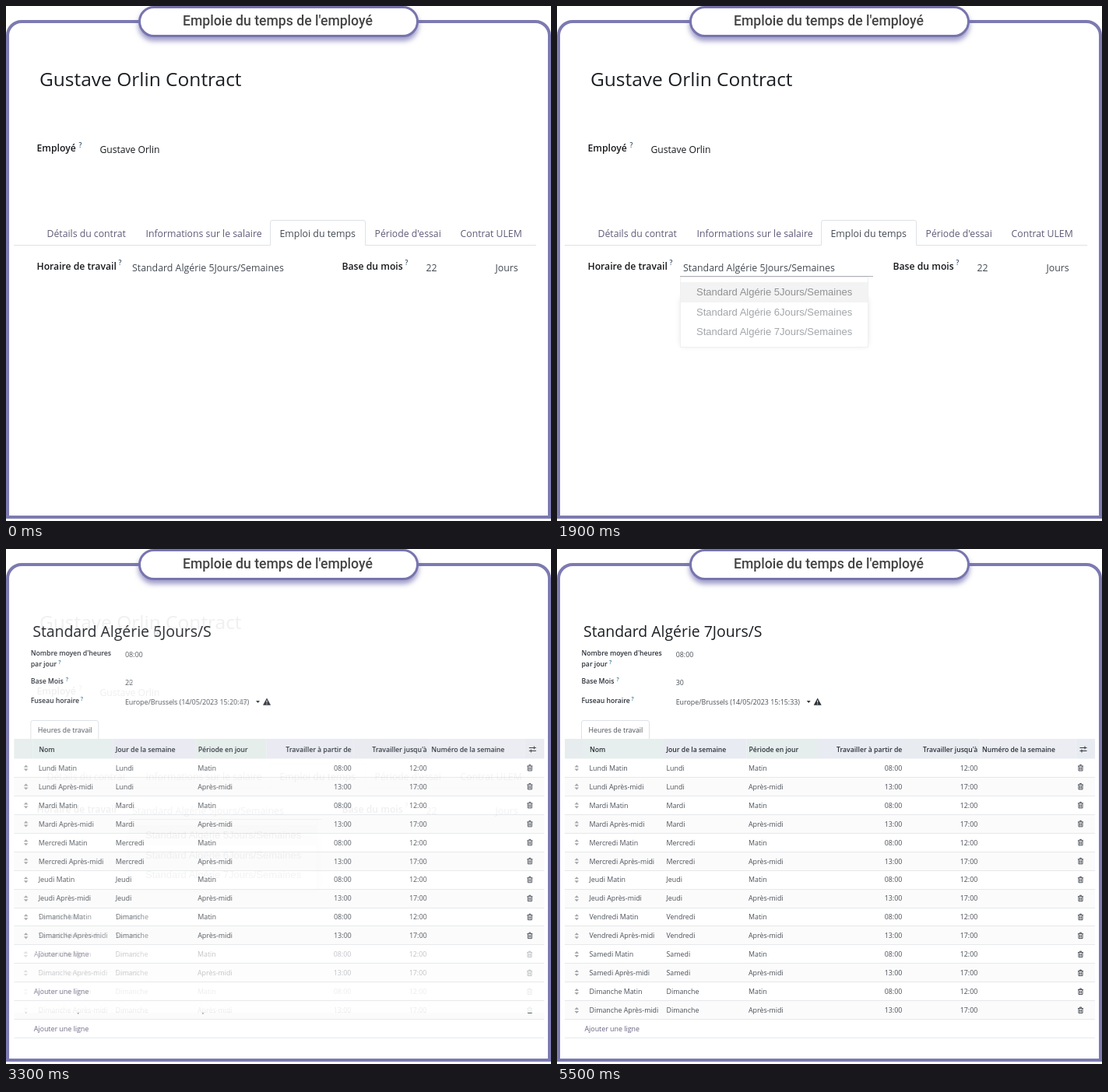
Animation of 700x662 px, one loop 6.5 s. Source, as an HTML page:

```html
<!DOCTYPE html>
<html lang="fr">
<head>
<meta charset="utf-8">
<title>Emploi du temps</title>
<style>
  html, body { margin: 0; width: 100%; height: 100%; overflow: hidden; background: #fff; }
  #stage { position: relative; width: 700px; height: 662px; overflow: hidden; }
  #frame { position: absolute; left: 0; top: 18px; width: 700px; height: 641px;
    box-sizing: border-box; border: 4px solid #7c7ab0; border-radius: 20px 20px 0 0; }
  #pill { position: absolute; left: 170px; top: 0; width: 360px; height: 40px;
    box-sizing: border-box; border: 3px solid #7774ae; border-radius: 20px; background: #fff;
    box-shadow: 0 5px 6px rgba(98, 94, 168, .62);
    font: 500 17.6px/33px Roboto, sans-serif; color: #444; text-align: center; }
  #pill span { position: relative; left: -1px; }
  svg { position: absolute; left: 0; top: 0; }
  text { font-family: "Open Sans", "Noto Sans", sans-serif; white-space: pre; }
  .title { font-size: 24.5px; fill: #1b1e22; }
  .label { font-size: 12.2px; font-weight: 600; fill: #17191d; }
  .value { font-size: 12.35px; fill: #444a52; }
  .name { font-size: 12.1px; fill: #17191d; }
  .tab { font-size: 12.25px; fill: #5f5c78; }
  .hint { font-size: 8.5px; font-weight: 600; fill: #3f5570; }
  .option { font: 13px "Liberation Sans", Arial, sans-serif; fill: #495057; }
  .heading { font-size: 19.4px; fill: #1b1e22; }
  .head { font-size: 8.64px; font-weight: 600; fill: #2b3038; }
  .cell { font-size: 8.85px; fill: #4a4f57; }
  .link { font-size: 8.85px; fill: #66627f; }
  .help { font-size: 7px; font-weight: 600; fill: #2f7296; }
</style>
</head>
<body>
<div id="stage">
  <div id="frame"></div>
  <svg id="scene" width="700" height="662"></svg>
  <div id="pill"><span>Emploie du temps de l'employé</span></div>
</div>
<script>
const LOOP = 6500;
const LINE = '#dee2e6';

const text = (cls, x, y, str, anchor = 'start') =>
  `<text class="${cls}" x="${x}" y="${y}" text-anchor="${anchor}">${str}</text>`;
const rect = (x, y, w, h, fill, extra = '') =>
  `<rect x="${x}" y="${y}" width="${w}" height="${h}" fill="${fill}" ${extra}/>`;
const path = (d, stroke, fill = 'none') =>
  `<path d="${d}" stroke="${stroke}" fill="${fill}"/>`;

function contract() {
  const tabs = [[52.5, 'Détails du contrat'], [179.5, 'Informations sur le salaire'],
    [473.5, "Période d'essai"], [583.5, 'Contrat ULEM']];
  return text('title', 43, 103, 'Gustave Orlin Contract')
    + text('label', 39.5, 187, 'Employé') + text('hint', 93.5, 182, '?')
    + text('name', 120.5, 189, 'Gustave Orlin')
    + path('M10 307.5H339.5V278q0-2.5 2.5-2.5H459q2.5 0 2.5 2.5V307.5H681', LINE)
    + tabs.map(([x, s]) => text('tab', x, 297, s)).join('')
    + text('value', 351.5, 297, 'Emploi du temps')
    + '<g id="schedule">'
    + text('label', 39.5, 339, 'Horaire de travail') + text('hint', 144.5, 333, '?')
    + text('value', 162, 341, 'Standard Algérie 5Jours/Semaines') + '</g>'
    + text('label', 431.5, 339, 'Base du mois') + text('hint', 512.5, 333, '?')
    + text('value', 539.5, 341, '22') + text('value', 628.5, 341, 'Jours');
}

function dropdown() {
  const options = [5, 6, 7].map((n, i) =>
    `<text class="option" x="179" y="${372 + i * 25.6}" ${i ? '' : 'style="fill:#212529"'}>`
    + `Standard Algérie ${n}Jours/Semaines</text>`).join('');
  return '<g id="dropdown" opacity="0">'
    + rect(160, 375, 238, 61, '#000', 'opacity=".3" filter="url(#blur)"')
    + rect(158.5, 348.5, 241, 90, '#fff', `stroke="${LINE}"`)
    + rect(159, 355, 240, 26, '#e9e9e9')
    + path('M158 347.5H406', '#5c6269') + options + '</g>';
}

const handle = y =>
  path(`M22.5 ${y - 1}l2.8-3 2.8 3zM22.5 ${y + 1}l2.8 3 2.8-3z`, 'none', '#a3a6aa');
const trash = y => path(`M669 ${y - 2.5}h7M671.5 ${y - 3}v-1h2v1`
  + `M670 ${y - 2.5}v6h5v-6M671.7 ${y - 1}v3.3M673.3 ${y - 1}v3.3`, '#4a4f57');

const rowY = i => 281.5 + 23.96 * i;

function row(day, half, i) {
  const y = rowY(i), base = y + 3.2, noon = half ? 'Après-midi' : 'Matin';
  return (half ? rect(10, y - 12, 681, 24, '#fbfbfb') : '')
    + handle(y) + trash(y)
    + text('cell', 41.5, base, `${day} ${noon}`) + text('cell', 140.5, base, day)
    + text('cell', 246, base, noon)
    + text('cell', 443.3, base, half ? '13:00' : '08:00', 'end')
    + text('cell', 540.3, base, half ? '17:00' : '12:00', 'end');
}

function tableHead() {
  const columns = [[10, '#e7edee'], [34, '#e6efee'], [137, '#e9ebf2'], [243.5, '#e5eeec'],
    [334, '#e9ebf2'], [446, '#e8ebf0'], [543.5, '#ebedf2'], [666.5, '#e8ebf1'], [691]];
  let out = '';
  for (let i = 0; i < columns.length - 1; i++) {
    const [x, fill] = columns[i];
    out += rect(x, 244, columns[i + 1][0] - x, 25.5, fill);
  }
  return out
    + text('head', 42, 260.5, 'Nom') + text('head', 140.5, 260.5, 'Jour de la semaine')
    + text('head', 246.5, 260.5, 'Période en jour')
    + text('head', 443.3, 260.5, 'Travailler à partir de', 'end')
    + text('head', 540.3, 260.5, "Travailler jusqu'à", 'end')
    + text('head', 546, 260.5, 'Numéro de la semaine')
    + path('M671.5 255.5h9M671.5 259.5h9M678 253.5v4M674 257.5v4', '#343a40');
}

function schedule({ n, month, clock, extra, shift }) {
  const days = ['Lundi', 'Mardi', 'Mercredi', 'Jeudi', ...extra, 'Dimanche'];
  const count = days.length * 2;
  let rows = days.map((d, i) => row(d, 0, 2 * i) + row(d, 1, 2 * i + 1)).join('');
  // Shorter weeks keep a cropped trace of the fourteenth row.
  if (count < 14) rows += row('Dimanche', 1, 13) + rect(8, 581, 684, 14.9, '#fff');
  for (let i = 0; i < 15; i++) {
    rows += rect(10, Math.round(rowY(i) + 11.3), 681, 1, '#e6e8eb');
    if (i >= count && i % 2 === 0) rows += text('link', 35.5, rowY(i) + 3.2, 'Ajouter une ligne');
  }
  return `<g id="week${n}" opacity="0">` + rect(6, 60, 688, 590, '#fff')
    + `<g transform="translate(${shift})">`
    + text('heading', 34, 112.7, `Standard Algérie ${n}Jours/S`)
    + text('head', 31.5, 137.3, "Nombre moyen d'heures") + text('head', 31.5, 150.8, 'par jour')
    + text('help', 67, 148, '?')
    + text('head', 31.5, 173.3, 'Base Mois') + text('help', 76.5, 170, '?')
    + text('head', 31.5, 198.3, 'Fuseau horaire') + text('help', 95.5, 195, '?')
    + text('cell', 152.7, 139, '08:00') + text('cell', 152.7, 174.8, month)
    + text('cell', 152.7, 199.8, `Europe/Brussels (14/05/2023 ${clock})`)
    + path('M320.7 195h5l-2.5 3z', 'none', '#343a40')
    + path('M334.7 191.5l5 9.3h-10z', 'none', '#2b3038')
    + path('M334.7 194.5v3M334.7 198.5v1.2', '#fff')
    + path('M31.5 244V223q0-2.5 2.5-2.5H116q2.5 0 2.5 2.5V244', LINE)
    + text('cell', 40.5, 236, 'Heures de travail')
    + tableHead() + rows + '</g></g>';
}

const weeks = [
  { n: 7, month: 30, clock: '15:15:33', extra: ['Vendredi', 'Samedi'], shift: 0, end: LOOP },
  { n: 6, month: 26, clock: '15:20:18', extra: ['Samedi'], shift: 0, end: 5500 },
  { n: 5, month: 22, clock: '15:20:47', extra: [], shift: .5, end: 4500 }
];

const byId = id => document.getElementById(id);
byId('scene').innerHTML =
  '<filter id="blur" x="-10%" y="-30%" width="120%" height="160%">'
  + '<feGaussianBlur stdDeviation="4"/></filter>'
  + contract() + dropdown() + weeks.map(schedule).join('');

// Opacity rises in equal steps, one every 100 ms.
const fade = (t, start, steps) =>
  Math.max(0, Math.min(1, (Math.floor((t - start) / 100) + 1) / steps));

function draw() {
  const t = performance.now() % LOOP;
  const blinkOff = t >= 1000 && t < 1600 && (t - 1000) % 400 < 200;
  byId('schedule').setAttribute('opacity', blinkOff ? 0 : 1);
  byId('dropdown').setAttribute('opacity', fade(t, 1800, 4));
  for (const { n, end } of weeks)
    byId('week' + n).setAttribute('opacity', t < end ? fade(t, 3100, 5) : 0);
  requestAnimationFrame(draw);
}
draw();
</script>
</body>
</html>
```
